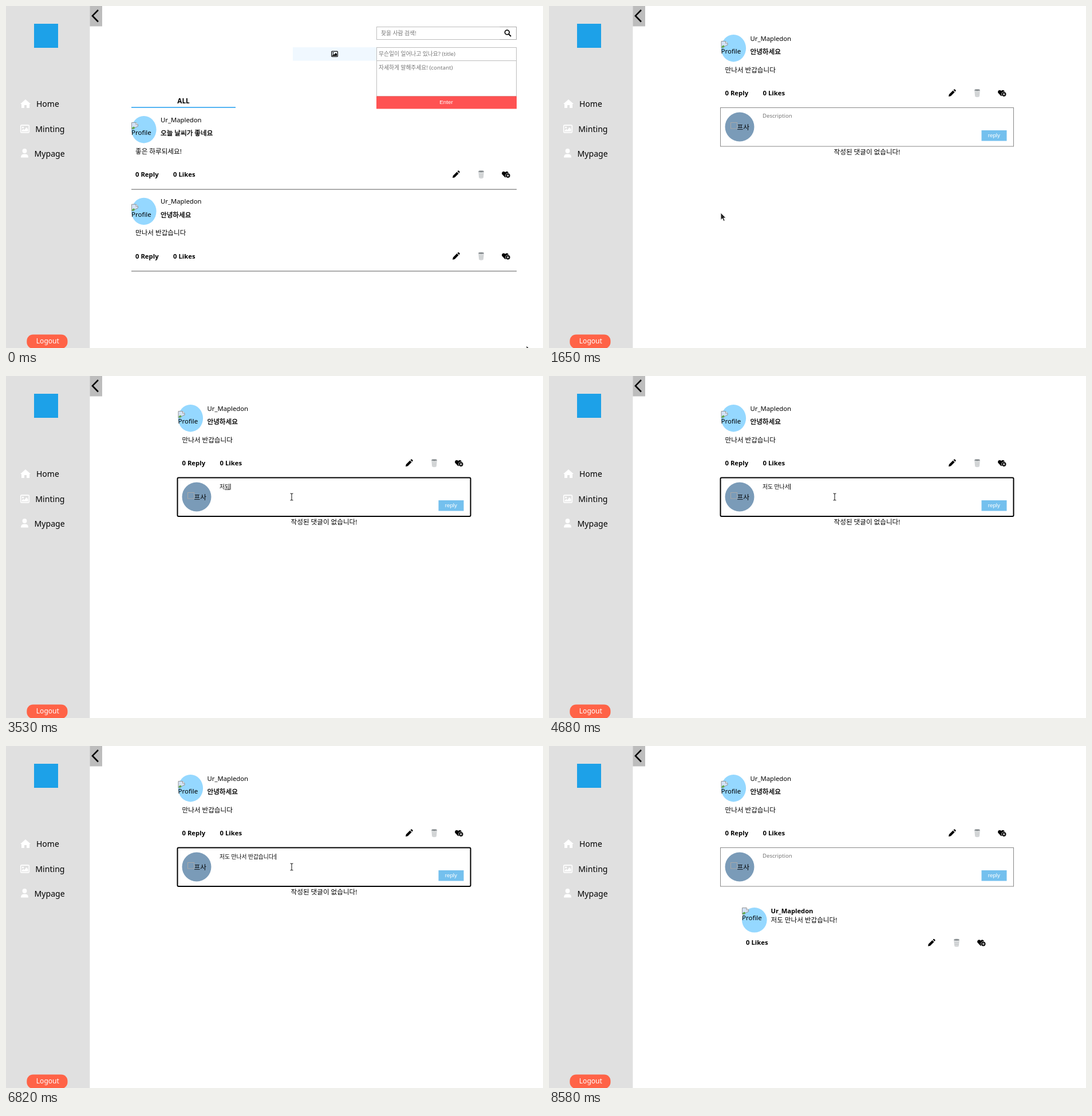
Write an HTML page that moves like this. It is 938 px wide and 597 px high and loops after 9080 ms.

```html
<!DOCTYPE html>
<html lang="ko">
<head>
<meta charset="utf-8">
<style>
  html, body { margin: 0; width: 100%; height: 100%; overflow: hidden; background: #fff; }
  svg { display: block; }
  text { font-family: "Noto Sans", "Noto Sans CJK KR", "Noto Sans CJK", sans-serif; white-space: pre; }
  .arial { font-family: "Liberation Sans", sans-serif; }
  .medium { stroke: #000; stroke-width: .35; }
  .composing { text-decoration: underline; }
</style>
</head>
<body>
<svg id="stage" width="938" height="597" viewBox="0 0 938 597">
  <defs>
    <g id="picture">
      <rect x="-5.3" y="-4.6" width="10.6" height="9.2" rx="1" fill="none" stroke="currentColor" stroke-width="1.2"/>
      <circle cx="-2.5" cy="-1.8" r="1.1" fill="currentColor"/>
      <path d="M-4 3.2V2l2-2 1.4 1.4L2-2 4 .4v2.8z" fill="currentColor"/>
    </g>
    <g id="pencil">
      <path d="M-6 6l.8-3.8L1.6-4.6l3 3L-2.2 5.2zM2.5-5.5l1-.9q.8-.7 1.6 0l1.3 1.3q.7.8 0 1.6l-1 1z"/>
    </g>
    <g id="trash">
      <path d="M-4.4-5L-3.2 6Q0 7.2 3.2 6L4.4-5z" fill="#e6e8e9" stroke="#b4b8ba" stroke-width=".6"/>
      <path d="M-2.2-3l.6 8.6M0-3v9M2.2-3l-.6 8.6M-4 0h8M-3.7 3h7.4" stroke="#b0b4b6" stroke-width=".5"/>
      <ellipse cy="-5.2" rx="4.7" ry="1.4" fill="#777d80" stroke="#b4b8ba" stroke-width=".8"/>
    </g>
    <g id="heart">
      <path d="M-1 5.5L-6 .3C-8-2-6.3-5.4-3.6-5.3Q-2-5.2-1-3.8 0-5.2 1.6-5.3C4.3-5.4 6-2 4 .3z"/>
      <circle cx="3.7" cy="2" r="4.2" stroke="#fff" stroke-width=".7"/>
      <path d="M1.6 2h4.2M3.7-.1v4.2" stroke="#fff"/>
    </g>
    <g id="actions">
      <use href="#pencil"/><use href="#trash" x="44"/><use href="#heart" x="87"/>
    </g>
    <g id="broken">
      <path d="M.5 12V.5H8L11.5 4v3L7 9l-3 3z" fill="#d3e2f7" stroke="#8b8b8b" stroke-width=".9"/>
      <path d="M1.2 11.5V9.5L4 7.5 6.500 9 4 11.5z" fill="#58a846"/>
      <path d="M8 .5V4h3.5" fill="#fff" stroke="#8b8b8b" stroke-width=".9"/>
    </g>
  </defs>
  <g id="page"></g>
  <circle id="click" r="10" fill="#f5ef3c" style="mix-blend-mode:multiply"/>
  <path id="arrow" d="M0 0V12.5L2.9 9.8 5 14.5 7.2 13.5 5.1 9H9z" fill="#222" stroke="#fff" stroke-width=".8"/>
  <path id="beam" d="M-2.5-6Q-.5-6 0-5 .5-6 2.5-6M0-5V5M-2.5 6Q-.5 6 0 5 .5 6 2.5 6" fill="none" stroke="#222" stroke-width="1.1"/>
</svg>
<script>
const LOOP = 9080, FRAME = 126.1;
const NAME = 'Ur_Mapledon';
const $ = id => document.getElementById(id);

const text = (x, y, size, str, attrs = '') => `<text x="${x}" y="${y}" font-size="${size}" ${attrs}>${str}</text>`;
const rect = (x, y, w, h, fill, attrs = '') => `<rect x="${x}" y="${y}" width="${w}" height="${h}" fill="${fill}" ${attrs}/>`;
const use = (id, x, y) => `<use href="#${id}" x="${x}" y="${y}"/>`;
const group = (id, ...parts) => `<g id="${id}">${parts.join('')}</g>`;
const bold = 'font-weight="600"', medium = 'class="medium"', middle = 'text-anchor="middle"';
const hint = 'fill="#757575"', border = 'stroke="#bdbdbd"';

const avatar = (x, y, ry, iconY) =>
  `<ellipse cx="${x + 21.8}" cy="${y + ry}" rx="21.8" ry="${ry}" fill="#95d8ff"/>` +
  use('broken', x, y + iconY) + text(x, y + iconY + 22, 11.5, 'Profile');

const post = (x, y, actionsX, title, body) => avatar(x, y, 23.7, 11) +
  text(x + 51, y + 10.5, 11.3, NAME) + text(x + 51, y + 34, 11.6, title, medium) +
  text(x + 7, y + 65.5, 11.6, body) +
  text(x + 7, y + 106, 11.3, '0 Reply', bold) + text(x + 73, y + 106, 11.3, '0 Likes', bold) +
  use('actions', actionsX, y + 102);

const sidebar = group('sidebar',
  rect(0, 0, 146.4, 597, '#e0e0e0'),
  rect(49, 31, 42, 42, '#1da1e8'),
  rect(146.4, 0, 21.6, 35.5, '#bdbdbd'),
  '<path d="M161 7L151 17.2 161 27.5" fill="none" stroke="#000" stroke-width="2.6"/>',
  '<path d="M25 171L34 163l9 8h-2v7h-5v-5h-4v5h-5v-7z" fill="#fff"/>',
  '<g color="#fff" transform="translate(33 214.5) scale(1.38)"><use href="#picture"/></g>',
  '<path d="M26 264.5q0-6 5-6h3q5 0 5 6z" fill="#fff"/><circle cx="32.5" cy="253" r="3.9" fill="#fff"/>',
  text(53, 176.2, 14, 'Home'), text(51.3, 219.8, 14.1, 'Minting'), text(49.5, 262.5, 14.1, 'Mypage'),
  rect(36.3, 573.5, 71.2, 24.5, '#ff6347', 'rx="11"'),
  text(72.8, 589, 12, 'Logout', `fill="#fff" ${middle}`));

const feed = group('feed',
  rect(647.5, 36.5, 244, 22, '#fff', border),
  text(655, 50.8, 9.75, '찾을 사람 검색!', hint),
  '<path d="M862.5 36.5h29v22h-29" fill="none" stroke="#aaa"/>',
  '<circle cx="875.3" cy="46" r="3.9" fill="none" stroke="#000" stroke-width="1.7"/><path d="M878 49l4 4" stroke="#000" stroke-width="2"/>',
  rect(501, 72, 146, 23.5, '#f0f8ff'), use('picture', 574, 83.7),
  rect(647.5, 72.5, 244, 23, '#fff', border), text(651, 87.3, 9.75, '무슨일이 일어나고 있나요? (title)', hint),
  rect(647.5, 95.5, 244, 62, '#fff', border), text(651, 110.5, 9.75, '자세하게 말해주세요! (contant)', hint),
  rect(647, 157.5, 245, 22, '#ff5252'),
  text(769, 171, 9.75, 'Enter', `class="arial" fill="#fff" ${middle}`),
  text(310, 170, 11.8, 'ALL', `${bold} ${middle}`),
  rect(219, 176, 182, 2, '#55b5f3'),
  rect(270, 335, 622, 37.5, '#f0f8ff', 'id="hover"'),
  post(219, 192, 786, '오늘 날씨가 좋네요', '좋은 하루되세요!'),
  post(219, 334.7, 786, '안녕하세요', '만나서 반갑습니다'),
  rect(219, 319.5, 673, 1.2, '#777'), rect(219, 462.2, 673, 1.2, '#777'));

const detail = group('detail',
  post(300.5, 50, 704, '안녕하세요', '만나서 반갑습니다'),
  rect(299.5, 177.5, 512, 67.5, '#fff', 'id="box"'),
  '<circle cx="333" cy="211" r="25.5" fill="#7a9bb8"/>',
  rect(317.5, 203.5, 11, 10.5, 'none', 'stroke="#a9a9a9"'),
  text(328.5, 216, 11.6, '프사'),
  text(373, 194.5, 9.6, 'Description', `id="hint" ${hint}`),
  text(373, 196.7, 9.75, '', 'id="typed"'),
  rect(373, 187, 1, 10.5, '#000', 'id="caret"'),
  rect(755.5, 217, 44, 18.5, '#74c0ee'),
  text(777.3, 229.3, 9.75, 'reply', `class="arial" fill="#fff" ${middle}`),
  text(555.5, 259, 11.6, '작성된 댓글이 없습니다!', `id="empty" ${middle}`),
  group('answer', avatar(337, 282, 21.8, 0),
    text(387.5, 292.3, 11.2, NAME, bold), text(387.5, 308.3, 11.6, '저도 만나서 반갑습니다!'),
    text(344, 347, 11.3, '0 Likes', bold), use('actions', 668, 343.5)));

$('page').innerHTML = sidebar + feed + detail;

// A trailing underscore marks a syllable that is still being composed.
const typing = {
  25: 'ㅈ_', 26: '저_', 27: '젇_', 28: '저되_', 29: '저도_', 30: '저도 ', 31: '저도 마_', 32: '저도 만_',
  33: '저도 만나_', 35: '저도 만낫_', 36: '저도 만나서_', 37: '저도 만나서',
  42: '저도 만나서 ㅂ_', 43: '저도 만나서 반_', 44: '저도 만나서 반ㄱ_', 45: '저도 만나서 반가_',
  46: '저도 만나서 반갑_', 47: '저도 만나서 반갑스_', 48: '저도 만나서 반갑습_', 49: '저도 만나서 반갑습니_',
  50: '저도 만나서 반갑습닏_', 51: '저도 만나서 반갑습니다_', 52: '저도 만나서 반갑습니다',
  54: '저도 만나서 반갑습니다!'
};

// step, x, y
const path = [
  [0, 909, 593], [5, 296, 368], [6, 296, 368], [7, 300, 361], [14, 300, 361], [19, 499, 211],
  [57, 499, 211], [62, 777, 227], [64, 777, 227], [65, 815, 330], [66, 845, 470], [67, 859, 585], [68, 862, 610]
];

function pointer(step) {
  const i = path.findIndex(p => p[0] > step);
  if (i < 0) return path[path.length - 1].slice(1);
  const [s0, x0, y0] = path[i - 1], [s1, x1, y1] = path[i];
  const u = (step - s0) / (s1 - s0), e = u * u * (3 - 2 * u);
  return [x0 + (x1 - x0) * e, y0 + (y1 - y0) * e];
}

const show = (id, on) => $(id).style.display = on ? '' : 'none';
const during = (step, from, to) => step >= from && step < to;

function showTyping(step, focused) {
  const last = Object.keys(typing).filter(s => s <= step).pop();
  const entry = focused && last ? typing[last] : '';
  const str = entry.replace('_', '');
  $('typed').innerHTML = entry === str ? str : `${str.slice(0, -1)}<tspan class="composing">${str.slice(-1)}</tspan>`;
  show('hint', !str);
  show('caret', focused && !during(step, 23, 25));
  $('caret').setAttribute('x', 373 + (str ? $('typed').getComputedTextLength() + .5 : 0));
  $('caret').setAttribute('y', str ? 188 : 186);
}

function render(step) {
  const inDetail = step >= 12, focused = during(step, 19, 64), sent = step >= 64;
  show('feed', !inDetail);
  show('detail', inDetail);
  $('hover').style.opacity = Math.min(1, Math.max(0, (step - 7) / 2));
  const box = $('box');
  box.setAttribute('stroke', focused ? '#000' : '#888');
  box.setAttribute('stroke-width', focused ? 2 : 1);
  box.setAttribute('rx', focused ? 2 : 0);
  show('empty', !sent);
  show('answer', sent);
  if (inDetail) showTyping(step, focused);

  const [x, y] = pointer(step);
  const overText = inDetail && x > 373 && x < 750 && y > 180 && y < 242;
  $('arrow').setAttribute('transform', `translate(${x} ${y})`);
  $('beam').setAttribute('transform', `translate(${x} ${y})`);
  $('click').setAttribute('transform', `translate(${x + 1} ${y + 1})`);
  show('arrow', !overText);
  show('beam', overText);
  show('click', during(step, 10, 12) || step === 19 || step === 63);
}

function tick() {
  render(Math.floor((performance.now() % LOOP + 5) / FRAME));
  requestAnimationFrame(tick);
}
tick();
</script>
</body>
</html>
```
